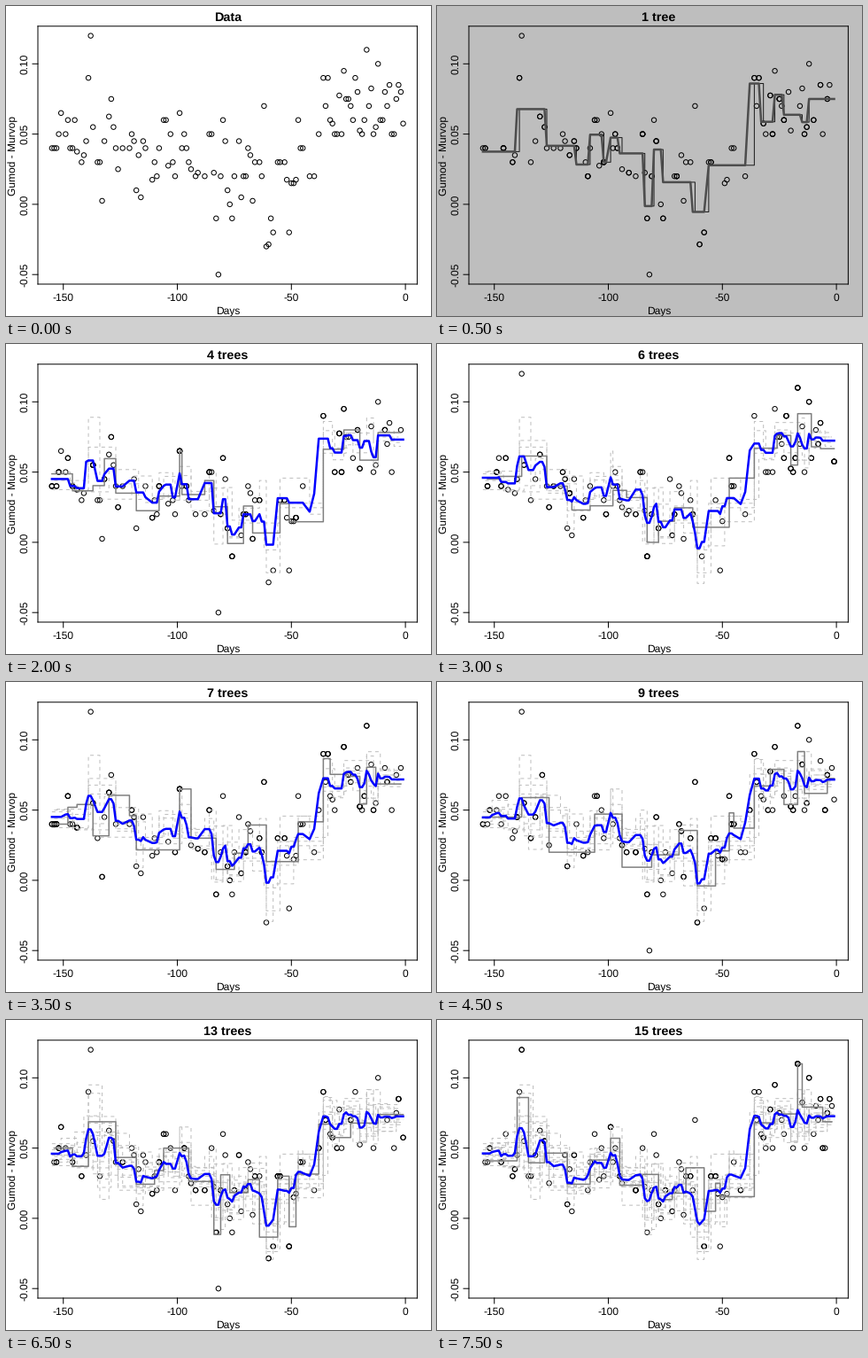
Animation of 480 by 350 pixels, one loop 8000 ms. Source, as a matplotlib script:

```python
import numpy as np
import matplotlib.pyplot as plt
from matplotlib.animation import FuncAnimation
from matplotlib.lines import Line2D
from matplotlib.patches import Rectangle

W, H, DPI = 480, 350, 100
PX = 72 / DPI  # points per pixel
TREES = 15
rng = np.random.default_rng(8)

# Lead in thousandths: a trend through key days, and a few unusual polls
KEY_DAYS = [-155, -146, -139, -135, -126, -117, -111, -106, -99, -97, -87, -85,
            -76, -70, -64, -60, -52, -49, -41, -38, -30, -27, -1]
KEY_LEADS = [48, 45, 60, 47, 46, 27, 27, 44, 44, 35, 33, 12,
             16, 24, 26, 2, 6, 29, 33, 62, 67, 73, 69]
UNUSUAL = {-139: 90, -138: 120, -82: -50, -61: -30, -60: -28.5,
           -36: 90, -27: 95, -12: 100}


def smooth(v, width=9):
    ones = np.ones(width)
    return np.convolve(v, ones, "same") / np.convolve(np.ones(len(v)), ones, "same")


def make_polls():
    """Scatter polls round the trend so that their local mean stays on it."""
    gaps = rng.choice(np.setdiff1d(np.arange(-154, -34), list(UNUSUAL)), 24, False)
    days = np.setdiff1d(np.arange(-155, 0), gaps)
    trend = np.interp(days, KEY_DAYS, KEY_LEADS)
    lead = trend + rng.uniform(-27, 27, len(days))
    unusual = np.isin(days, list(UNUSUAL))
    for _ in range(4):
        lead[unusual] = [UNUSUAL[d] for d in days[unusual]]
        lead -= smooth(lead - trend)
    step = rng.choice([10, 5, 2.5], len(days), p=[0.5, 0.3, 0.2])
    lead = np.round(lead / step) * step
    lead[unusual] = [UNUSUAL[d] for d in days[unusual]]
    return days, lead / 1000


def deviance(y):
    return np.sum((y - y.mean()) ** 2)


def grow(x, y, at, least):
    """Regression tree on x, y, evaluated at the given days."""
    fit = np.full(len(at), y.mean())
    if len(y) < 10 or deviance(y) < least:
        return fit
    u = np.unique(x)
    cuts = [c for c in (u[1:] + u[:-1]) / 2 if 5 <= np.sum(x < c) <= len(x) - 5]
    if not cuts:
        return fit
    cut = min(cuts, key=lambda c: deviance(y[x < c]) + deviance(y[x >= c]))
    for side, part in ((x < cut, at < cut), (x >= cut, at >= cut)):
        fit[part] = grow(x[side], y[side], at[part], least)
    return fit


days, lead = make_polls()
samples = [rng.integers(0, len(days), len(days)) for _ in range(TREES)]
fits = [grow(days[s], lead[s], days, 0.01 * deviance(lead[s])) for s in samples]

plt.rcParams["font.family"] = "Liberation Sans"
plt.rcParams["text.hinting"] = "none"
fig = plt.figure(figsize=(W / DPI, H / DPI), dpi=DPI)
back = Rectangle((0, 0), 1, 1, transform=fig.transFigure, lw=0, zorder=-1)
fig.add_artist(back)

ax = fig.add_axes([36 / W, 36 / H, 428.4 / W, 291.2 / H], facecolor="none")
ax.set(xlim=(-161.16, 5.16), ylim=(-0.0568, 0.1268), xticks=[], yticks=[])
for spine in ax.spines.values():
    spine.set(linewidth=PX, snap=False)


def text(x, y, s, size=12, **kw):
    """Centred text with its baseline at pixel (x, y) from the top left."""
    return fig.text(x / W, 1 - y / H, s, fontsize=size * PX, ha="center",
                    va="baseline", rotation_mode="anchor", **kw)


def tick(x, y, dx, dy):
    fig.add_artist(Line2D([x / W, (x + dx) / W], [1 - y / H, 1 - (y + dy) / H],
                          color="black", lw=PX, snap=False))


for d in range(-150, 1, 50):
    x = 451.1 + d * 2.5758
    tick(x, 314, 0, 6)
    text(x, 333, str(d))
for v in (-0.05, 0, 0.05, 0.1):
    y = 223.9 - v * 1586
    tick(36, y, -6, 0)
    text(24, y, f"{v:.2f}", rotation=90)
text(250.2, 348, "Days")
text(12, 168.5, "Gumod - Murvop", rotation=90)
title = text(250.2, 17, "", 14.4, weight="bold")


def circles(idx):
    ax.scatter(days[idx], lead[idx], s=(5.4 * PX) ** 2, facecolors="none",
               edgecolors="black", linewidths=PX, zorder=2)


def curve(x, y, color, width, **kw):
    ax.plot(x, y, color=color, lw=width * PX, snap=False,
            solid_joinstyle="round", **kw)


def stairs(k, color, width, **kw):
    drawn = np.unique(samples[k])
    curve(days[drawn], fits[k][drawn], color, width, drawstyle="steps-post", **kw)


def draw(n):
    for artist in [*ax.lines, *ax.collections]:
        artist.remove()
    back.set_facecolor("#bebebe" if n == 1 else "white")
    if n == 0:
        title.set_text("Data")
        circles(np.arange(len(days)))
        return
    title.set_text(f"{n} tree" + "s" * (n > 1))
    circles(samples[n - 1])
    for k in range(n - 1):
        stairs(k, "#bebebe", 1, ls=(0, (4, 4)), zorder=3)
    if n == 1:
        tree_style, mean_color = ("#1a1a1a", 1), "#4d4d4d"
    else:
        tree_style, mean_color = ("#7f7f7f", 1.5), "#0000ff"
    stairs(n - 1, *tree_style, zorder=4)
    curve(days, np.mean(fits[:n], axis=0), mean_color, 2.5, zorder=5)


anim = FuncAnimation(fig, draw, frames=TREES + 1, interval=500,
                     init_func=lambda: draw(0), repeat=True, repeat_delay=0)
plt.show()
```
